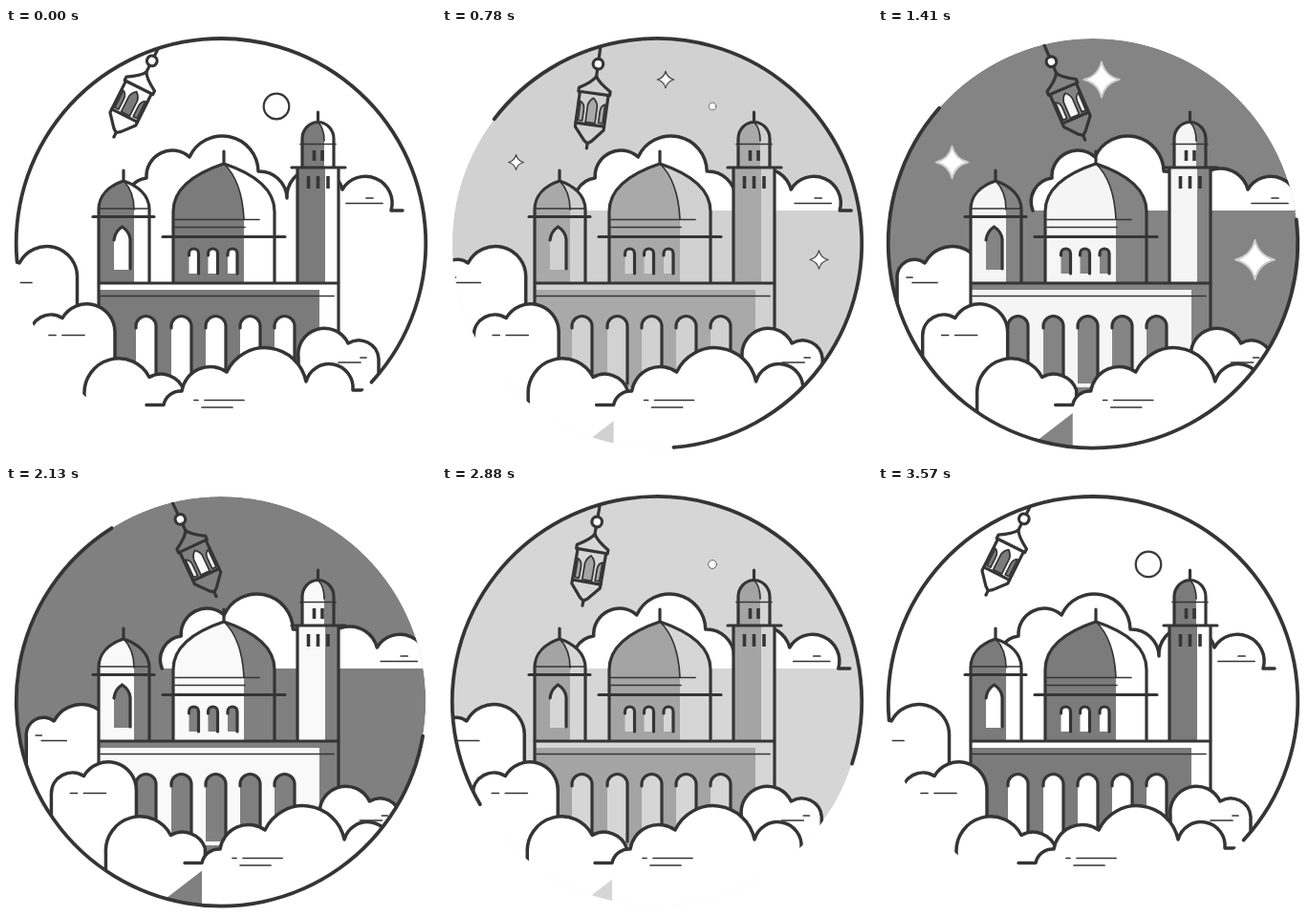
Write an HTML page that moves like this. It is 450x450 px and loops after 3600 ms.

```html
<!DOCTYPE html>
<html lang="en">
<head>
<meta charset="utf-8">
<title>Day and night</title>
<style>
  html, body { margin: 0; width: 100%; height: 100%; overflow: hidden; background: #fff; }
  svg { display: block; width: 100vw; height: 100vh; }
  .line, .thin, .cloud { stroke: #353535; stroke-linecap: round; stroke-linejoin: round; fill: none; }
  .line { stroke-width: 3.2; }
  .thin { stroke-width: 1.7; }
  .cloud { stroke-width: 3.5; }
  .white { fill: #fff; }
  .sky { fill: var(--sky); }
  .wall { fill: var(--wall); }
</style>
</head>
<body>
<svg id="scene" viewBox="0 0 450 450">
  <clipPath id="disc"><circle cx="225" cy="225.3" r="214.3"/></clipPath>
  <g clip-path="url(#disc)">
    <circle class="sky" cx="225" cy="225.3" r="214.3"/>
    <g id="stars"></g>
    <g id="sun"><circle class="line white" r="13.3" style="stroke-width:2.2"/></g>

    <g data-drift="38">
      <path class="white" d="M127 191A25 25 0 0 1 147 157A27 27 0 0 1 192 135A37.700 37.700 0 0 1 264 150A29 29 0 0 1 294 178A29.500 29.500 0 0 1 352 169A28 28 0 0 1 403 191Z"/>
      <path class="cloud" d="M127 191A25 25 0 0 1 147 157A27 27 0 0 1 192 135A37.700 37.700 0 0 1 264 150A29 29 0 0 1 294 178A29.500 29.500 0 0 1 352 169A28 28 0 0 1 403 191H415"/>
      <path class="thin" d="M377 178H384M356 183.500H394"/>
      <path class="cloud white" d="M-15 480V262A18 18 0 0 1 14 246A32 32 0 0 1 74.500 262V330"/>
      <path class="thin" d="M-5 261H1M1 266.500H27"/>
    </g>

    <!-- left tower -->
    <path class="sky" d="M97 266V190C97 175 108 165 123 160C138 165 150 175 150 190V266Z"/>
    <path class="wall" d="M97 266V190C97 175 108 165 123 160Q134 171 134 190V266Z"/>
    <path class="sky" d="M113 253V221Q114 213 121.500 208Q129 213 130 221V253Z"/>
    <path class="line" d="M97 266V190C97 175 108 165 123 160C138 165 150 175 150 190V266M123 149V160M91 197.500H155M113 222Q114 213 121.500 208Q129 213 130 221V252"/>
    <path class="thin" d="M123 160Q134 171 134 190M98 189H149"/>

    <!-- main dome -->
    <path class="sky" d="M175 266V192C175 168 198 152 228 142C258 152 281 168 281 192V266Z"/>
    <path class="wall" d="M175 266V192C175 168 198 152 228 142Q247 160 249 200V266Z"/>
    <path class="line" d="M175 266V192C175 168 198 152 228 142C258 152 281 168 281 192V266M228 129V142M164 218.500H292"/>
    <path class="thin" d="M228 142Q247 160 249 200M177 200.500H265M177 208.500H250"/>
    <g id="windows"></g>

    <!-- minaret -->
    <path class="sky" d="M310 146V116A16.500 17.500 0 0 1 343 116V146H348V266H305V146Z"/>
    <path class="wall" d="M310 146V116A16.500 17.500 0 0 1 326.500 98.500Q333 105 333 118V146H334V266H305V146Z"/>
    <path class="line" d="M310 146V116A16.500 17.500 0 0 1 343 116V146M326.500 88V98M299 146H355M305 146V266M348 146V266"/>
    <path class="thin" d="M308 121.500H345M326.500 98.500Q333 105 333 118"/>
    <path class="line" style="stroke-width:3.6;stroke-linecap:butt" d="M322.500 128V139M331 128V139M316.500 155V168M326.500 155V168M337 155V168"/>

    <!-- arcade -->
    <path class="sky" d="M97 266H348V380H97Z"/>
    <path class="wall" d="M97 274H328V376H97Z"/>
    <path class="line" d="M97 380V267H348V380"/>
    <path class="thin" d="M99 280.500H343"/>
    <g id="arches"></g>

    <g data-drift="23.5">
      <path class="cloud white" d="M25 480V322A22 22 0 0 1 59 303.500A29.500 29.500 0 0 1 114 318V400"/>
      <path class="thin" d="M45 321.500H52M59 321.500H82"/>
      <path class="cloud white" d="M306 390V345A27.400 27.400 0 0 1 358 330A21 21 0 0 1 390 346V480"/>
      <path class="thin" d="M371 345H377M348 350H371"/>
      <path class="cloud white" d="M82 480V384A36 36 0 0 1 150 365.500A25 25 0 0 1 186 379V400"/>
    </g>
    <g data-drift="42">
      <path class="white" d="M165 394A18 18 0 0 1 184 380A30 30 0 0 1 231 360A44 44 0 0 1 314 370A25 25 0 0 1 363 379H470V480H165Z"/>
      <path class="cloud" d="M147 394.500H165A18 18 0 0 1 184 380A30 30 0 0 1 231 360A44 44 0 0 1 314 370A25 25 0 0 1 363 379H373"/>
      <path class="thin" d="M197 389.500H201M208 389.500H249M205 397H237"/>
    </g>
  </g>

  <circle id="ring" class="line" cx="225" cy="225.3" r="214.3" pathLength="360" stroke-dasharray="228 132" style="stroke-width:3.8"/>

  <g clip-path="url(#disc)">
    <g id="lantern">
      <path class="line" d="M0 0V28M0 39V47M0 117V123"/>
      <circle class="line white" cy="34" r="5.300"/>
      <path class="line sky" d="M0 47Q-3 53 -16.500 61V65H-15V97L-15 102L-4 115L0 118L4 115L15 102L15 97V65H16.500V61Q3 53 0 47Z"/>
      <path class="line" d="M-16 65H16M-15 98H15"/>
      <path class="thin wall" d="M-5 96V78Q-4 73 0 70Q4 73 5 78V96ZM-13 95V75Q-8.500 77 -8.500 83V95ZM13 95V75Q8.500 77 8.500 83V95Z"/>
    </g>
  </g>
</svg>
<script>
const LOOP = 3600, HALF = LOOP / 2, LAG = 12;
const $ = id => document.getElementById(id);
const scene = $('scene');
const drifting = document.querySelectorAll('[data-drift]');
const clamp = x => Math.max(0, Math.min(1, x));
const mix = (a, b, p) => a + (b - a) * p;
const sine = x => (1 - Math.cos(Math.PI * clamp(x))) / 2;
const ease = x => x < .5 ? (2 * x) ** 2.3 / 2 : 1 - (2 - 2 * x) ** 2.3 / 2;
const gray = v => `rgb(${v},${v},${v})`;

// Round-topped opening, outlined over the top and down its right side
const opening = (x, y, w, bottom) => {
  const r = w / 2, top = `V${y + r}a${r} ${r} 0 0 1 ${w} 0V${bottom}`;
  return `<path class="sky" d="M${x} ${bottom}${top}Z"/><path class="line" d="M${x} ${y + r + 2}${top}"/>`;
};
$('windows').innerHTML = [191.5, 211.5, 232].map(x => opening(x, 231, 10, 257)).join('');
$('arches').innerHTML = [136, 173, 209, 245, 281].map(x => opening(x, 301.5, 21, 372)).join('');

const stars = [[234, 54, 20], [77.5, 140.5, 18], [394.5, 242.5, 22]];
$('stars').innerHTML = stars.map(() =>
  '<path fill="#fff" stroke-linejoin="round" vector-effect="non-scaling-stroke" ' +
  'd="M0-1Q.2-.2 1 0Q.2 .2 0 1Q-.2 .2-1 0Q-.2-.2 0-1Z"/>').join('');

// Ring rotation: two surges per turn, joined by a monotone cubic
const turns = [[0, 0], [480, 8.5], [990, 80], [1410, 178.6], [2130, 195], [2880, 335], [LOOP, 360]];
const slope = i => (turns[i + 1][1] - turns[i][1]) / (turns[i + 1][0] - turns[i][0]);
const tangent = i => {
  if (i === 0 || i === turns.length - 1) return 0;
  const a = slope(i - 1), b = slope(i);
  return 2 * a * b / (a + b);
};
function ringTurn(t) {
  let i = 0;
  while (t > turns[i + 1][0]) i++;
  const [t0, v0] = turns[i], [t1, v1] = turns[i + 1], d = t1 - t0, u = (t - t0) / d;
  return mix(v0, v1, u * u * (3 - 2 * u)) +
    d * u * (1 - u) * (tangent(i) * (1 - u) - tangent(i + 1) * u);
}

function draw(now) {
  const t = now % LOOP;
  const late = (t - LAG + LOOP) % LOOP;
  const phase = Math.min(late, LOOP - late);
  const night = ease(phase / HALF);

  scene.style.setProperty('--sky', gray(mix(255, 122, night)));
  scene.style.setProperty('--wall', gray(mix(123, 255, night)));
  for (const g of drifting) g.setAttribute('transform', `translate(${g.dataset.drift * night})`);
  $('lantern').setAttribute('transform', `translate(168 4) rotate(${mix(26.6, -27.5, night)})`);
  $('sun').setAttribute('transform', `translate(283 82) scale(${1 - sine(phase / 1200)})`);
  $('ring').setAttribute('transform', `rotate(${ringTurn(t) - 185.3} 225 225.3)`);

  const grow = sine(t / 1700);
  $('stars').style.opacity = 1 - clamp((t - 1500) / 400);
  [...$('stars').children].forEach((star, i) => {
    const [x, y, r] = stars[i];
    star.setAttribute('transform', `translate(${x} ${y}) scale(${r * grow})`);
    star.setAttribute('stroke', gray(mix(70, 205, clamp((t - 950) / 450))));
    star.setAttribute('stroke-width', mix(.7, 2, grow));
  });
}

const start = performance.now();
function tick() {
  draw(performance.now() - start);
  requestAnimationFrame(tick);
}
tick();
</script>
</body>
</html>
```
